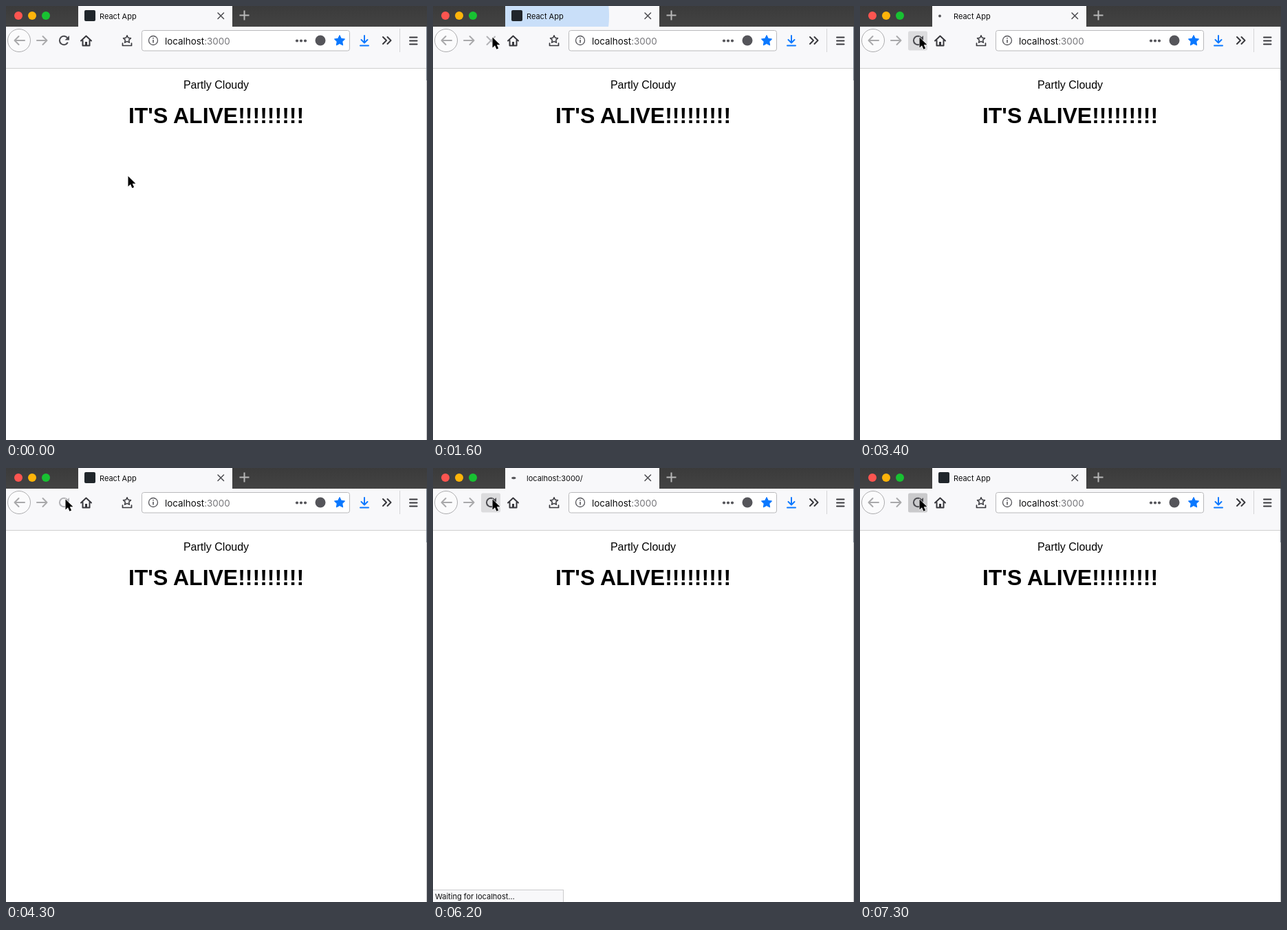
These frames come from a looping animation (612 px wide and 630 px high, 7400 ms). An HTML page:

```html
<!DOCTYPE html>
<html lang="en">
<head>
<meta charset="utf-8">
<title>Browser reload</title>
<style>
  html, body { margin: 0; width: 100%; height: 100%; overflow: hidden; background: #fff; }
  svg { display: block; width: 612px; height: 630px; }
  .ui { font-family: Inter, Roboto, sans-serif; font-size: 11px; fill: #0c0c0d; }
  .page { font-family: "Liberation Sans", Arial, sans-serif; fill: #000; text-anchor: middle; }
  .line { fill: none; stroke: #4a4a4f; stroke-width: 2; stroke-linecap: round; stroke-linejoin: round; }
</style>
</head>
<body>
<svg viewBox="0 0 612 630" xmlns="http://www.w3.org/2000/svg">
  <defs>
    <linearGradient id="bar" x1="0" y1="0" x2="0" y2="1">
      <stop offset="0" stop-color="#3b3b3b"/><stop offset="1" stop-color="#434343"/>
    </linearGradient>
    <clipPath id="tabClip"><rect x="105" y="0" width="224" height="30"/></clipPath>
  </defs>

  <rect width="612" height="630" fill="#fff"/>
  <g id="content" class="page">
    <text x="305.5" y="120" font-size="16">Partly Cloudy</text>
    <text x="305.5" y="170" font-size="32" font-weight="700">IT'S ALIVE!!!!!!!!!</text>
  </g>

  <!-- tab strip -->
  <rect width="612" height="30" fill="url(#bar)"/>
  <circle cx="18" cy="14" r="6" fill="#fc5550"/>
  <circle cx="38" cy="14" r="6" fill="#fdb40a"/>
  <circle cx="58" cy="14" r="6" fill="#18c132"/>
  <rect x="105" width="224" height="30" fill="#f8f8fa"/>
  <g clip-path="url(#tabClip)"><circle id="burst" cx="122" cy="14" fill="#0a74f5"/></g>
  <rect id="favicon" x="114" y="6" width="16" height="16" rx="2" fill="#20262b"/>
  <ellipse id="dot" cy="14.5" fill="#56565a"/>
  <text id="title" class="ui" x="136" y="18.5"></text>
  <path class="line" stroke-width="1.5" style="stroke-width:1.5" d="M308 10l8.500 8.500M316.500 10l-8.500 8.500"/>
  <path d="M339.500 13.500h14M346.500 6.500v14" stroke="#b8b8b8" stroke-width="2"/>

  <!-- toolbar -->
  <rect y="30" width="612" height="60" fill="#f8f8fa"/>
  <rect y="90" width="612" height="1" fill="#cfcfcf"/>
  <circle cx="19" cy="50" r="16.500" fill="#fbfbfc" stroke="#acacae"/>
  <path class="line" style="stroke:#a9a9ab" d="M27 50H12.500M18.500 44l-6 6 6 6M45 50h14.500M53.500 44l6 6-6 6"/>

  <rect id="hover" x="70" y="36.500" width="28" height="28" rx="2.500"/>
  <g id="reload">
    <path class="line" d="M89.400 46.500A6.300 6.300 0 1 0 89.800 52.800" style="stroke-linecap:butt"/>
    <path d="M92 43v6.500h-6.500z" fill="#4a4a4f"/>
  </g>
  <path id="stop" class="line"/>

  <path class="line" d="M109 50.500l7.500-7 7.500 7M111.500 50v7.500h10V50" style="stroke:#38383d"/>
  <rect x="115" y="52" width="3" height="6" fill="#38383d"/>
  <path class="line" style="stroke:#38383d;stroke-width:1.7" d="M169.500 54v3.500h13V54"/>
  <path id="shelfStar" fill="none" stroke="#38383d" stroke-width="1.500" stroke-linejoin="round"/>

  <rect x="197.500" y="35.500" width="302" height="29.500" rx="3" fill="#fff" stroke="#b9b9bb"/>
  <circle cx="214" cy="50" r="6.500" fill="none" stroke="#55555a" stroke-width="1.300"/>
  <path d="M214 49v4.500M214 46v1.600" stroke="#55555a" stroke-width="1.600"/>
  <text class="ui" x="231" y="55.500" style="font-size:13.4px">localhost<tspan fill="#76767a">:3000</tspan></text>
  <g fill="#55555a">
    <circle cx="423" cy="50.500" r="2.100"/><circle cx="429" cy="50.500" r="2.100"/><circle cx="435" cy="50.500" r="2.100"/>
    <circle cx="457" cy="50" r="7.500"/>
  </g>
  <path id="mark" fill="#0a78ff" stroke="#0a78ff" stroke-linejoin="round"/>
  <path class="line" style="stroke:#0a78ff" d="M521 43v10M516.500 49l4.500 4.500 4.500-4.500M515 57.500h12"/>
  <path class="line" style="stroke:#38383d" d="M548 45l5 5-5 5M554.500 45l5 5-5 5"/>
  <rect x="572" y="33" width="1" height="34" fill="#d4d4d6"/>
  <path class="line" style="stroke:#38383d" d="M587 45.500h10.500M587 50.500h10.500M587 55.500h10.500"/>

  <g id="status">
    <rect x="-.5" y="612.500" width="190" height="18" fill="#f8f8fa" stroke="#cbcbcd"/>
    <text id="message" class="ui" x="3" y="626"></text>
  </g>
  <rect x="611" y="30" width="1" height="600" fill="#bdbdbf"/>
  <rect x="611" y="30" width="1" height="78" fill="#6d7682"/>

  <path id="cursor" d="M0 0v15l3.500-3.200 2.400 5.400 2.700-1.200-2.400-5.200h4.700z" fill="#000" stroke="#fff" stroke-width="1.200" paint-order="stroke"/>
</svg>
<script>
const LOOP = 7400, STEP = 100;
const CLICKS = [1000, 2100, 3400, 4700, 6100];
const FROM = [177.5, 247], TO = [86.5, 45.5];
const el = id => document.getElementById(id);
const set = (id, attrs) => {
  for (const k in attrs) el(id).setAttribute(k, attrs[k]);
};
const show = (id, on) => set(id, { visibility: on ? "visible" : "hidden" });

function star(cx, cy, r, inner) {
  const pts = Array.from({ length: 10 }, (_, i) => {
    const a = i * Math.PI / 5 - Math.PI / 2, d = i % 2 ? r * inner : r;
    return (cx + d * Math.cos(a)).toFixed(2) + " " + (cy + d * Math.sin(a)).toFixed(2);
  });
  return "M" + pts.join("L") + "Z";
}
set("mark", { d: star(485, 50.5, 8, 0.5) });
set("shelfStar", { d: star(176, 48.5, 5.8, 0.48) });

function draw(t) {
  const click = CLICKS.filter(c => c <= t).pop();
  const age = click === undefined ? Infinity : t - click;
  const loading = age < 500, blank = age >= 200 && loading;
  const disabled = age >= 500 && age < 1000;

  // pointer glides to the reload button, then rests
  const p = Math.min(1, Math.max(0, t / 800));
  const e = p * p * (3 - 2 * p);
  const [x, y] = FROM.map((v, i) => v + (TO[i] - v) * e);
  set("cursor", { transform: `translate(${x.toFixed(2)} ${y.toFixed(2)})` });

  const over = x > 70 && x < 98 && y > 36 && y < 65;
  const pressed = t >= 7200 || CLICKS.includes(t + STEP);
  show("hover", over && !disabled);
  set("hover", { fill: pressed ? "#cacacc" : "#dcdcde" });

  show("content", !blank);
  show("favicon", !loading);
  el("title").textContent = age === 100 ? "localhost:3000/" : "React App";
  show("status", loading && age >= 100);
  el("message").textContent = blank ? "Read localhost" : "Waiting for localhost…";

  // connecting dot swings sideways, stretching in the middle
  const phase = 2 * Math.PI * age / 1050;
  show("dot", loading);
  if (loading) set("dot", {
    cx: 116 + 7.5 * (1 - Math.cos(phase)),
    rx: 2 + 2 * Math.abs(Math.sin(phase)),
    ry: 2 - 0.5 * Math.abs(Math.sin(phase))
  });

  // blue burst after the page has loaded
  const b = age - 500;
  const bursting = b >= 0 && b < 400;
  show("burst", bursting);
  if (bursting) set("burst", { r: 50 + 0.84 * b, opacity: 0.27 - 0.00075 * b });

  const stopping = age >= 300 && age < 700;
  show("reload", !stopping);
  set("reload", { opacity: disabled ? 0.4 : 1 });
  show("stop", stopping);
  set("stop", {
    d: "M78.500 44.500l11.500 11.500" + (age > 300 ? "M90 44.500l-11.500 11.500" : ""),
    opacity: disabled ? 0.4 : 1
  });
}

const start = performance.now();
function tick() {
  const t = (performance.now() - start) % LOOP;
  draw(Math.floor(t / STEP) * STEP);
  requestAnimationFrame(tick);
}
tick();
</script>
</body>
</html>
```
